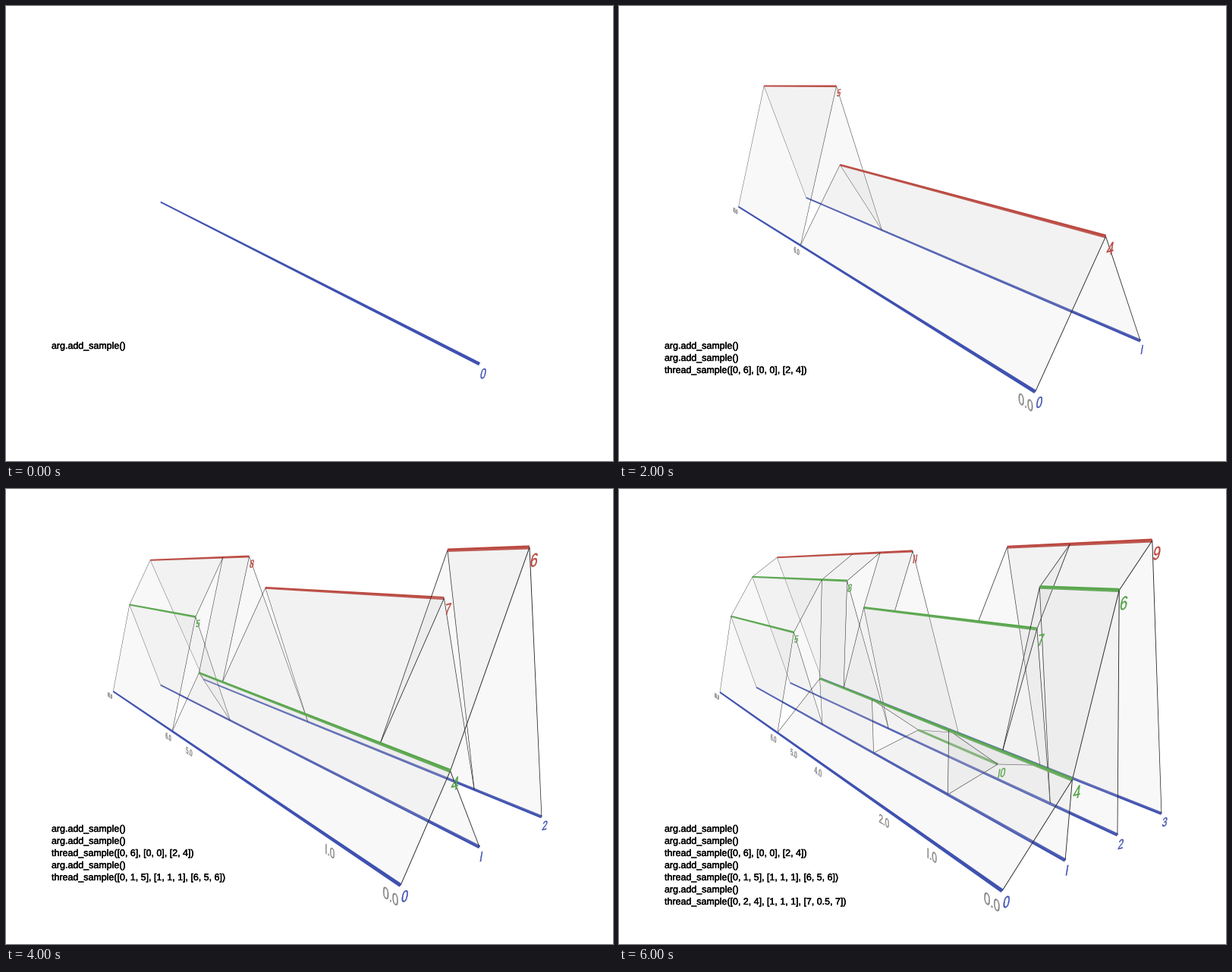
A matplotlib script for the animation above (7000 ms loop, 800 by 600 pixels).

```python
import matplotlib.pyplot as plt
from matplotlib.animation import FuncAnimation
from matplotlib.patches import PathPatch, Polygon
from matplotlib.path import Path
from matplotlib.patheffects import withStroke
from matplotlib.textpath import TextPath
import numpy as np

W, H, DPI = 800, 600, 100
LENGTH = 10
FIRST_NODE = 4
BLUE, RED, GREEN = "#3f51b0", "#bb473f", "#57a64b"
GREY, DARK, FACE = "#858585", "#222222", "#cccccc"
FONT = "Liberation Sans"

# Perspective of (sample axis, time along the line, height, 1)
CAMERA = np.array([[575.3, -15.88, -83.6, 433.1],
                   [40.8, 16.76, -549.5, 524.9],
                   [0.4131, 0.1603, -0.209, 0.9484]])

# None adds a sample, a tuple threads the newest one
STEPS = [
    None,
    None,
    ([0, 6], [0, 0], [2, 4]),
    None,
    ([0, 1, 5], [1, 1, 1], [6, 5, 6]),
    None,
    ([0, 2, 4], [1, 1, 1], [7, 0.5, 7]),
]


class Graph:
    """Ancestral graph with edges (start, end, child, parent)."""

    def __init__(self):
        self.samples = 0
        self.heights = {}
        self.edges = []

    def add_sample(self):
        self.heights[self.samples] = 0
        self.samples += 1

    def thread_sample(self, starts, partners, heights):
        sample = self.samples - 1
        ends = starts[1:] + [LENGTH]
        for lo, hi, partner, height in zip(starts, ends, partners, heights):
            node = FIRST_NODE + len(self.heights) - self.samples
            self.heights[node] = height
            self.join(lo, hi, partner, node)
            self.edges.append((lo, hi, sample, node))

    def join(self, lo, hi, child, node):
        """Climb from child and insert node at its height."""
        above = [e for e in self.edges
                 if e[2] == child and e[0] < hi and e[1] > lo]
        if not above:
            self.edges.append((lo, hi, child, node))
        for edge in above:
            start, end, _, parent = edge
            a, b = max(lo, start), min(hi, end)
            if self.heights[parent] <= self.heights[node]:
                self.join(a, b, parent, node)
                continue
            self.edges.remove(edge)
            pieces = [(start, a, child, parent), (a, b, child, node),
                      (a, b, node, parent), (b, end, child, parent)]
            self.edges += [p for p in pieces if p[0] < p[1]]

    def layout(self):
        """Place samples evenly and each node at the mean of its children."""
        place = {i: (i + 0.5) / self.samples for i in range(self.samples)}
        for node in sorted(self.heights, key=self.heights.get):
            if node not in place:
                below = {e[2] for e in self.edges if e[3] == node}
                place[node] = np.mean([place[c] for c in below])
        return place

    def span(self, node):
        if node < self.samples:
            return 0, LENGTH
        own = [e for e in self.edges if e[3] == node]
        return min(e[0] for e in own), max(e[1] for e in own)


fig = plt.figure(figsize=(W / DPI, H / DPI), dpi=DPI, facecolor="white")
ax = fig.add_axes([0, 0, 1, 1])


def fill(points, color, alpha=1.0):
    ax.add_patch(Polygon(points, closed=True, facecolor=color,
                         edgecolor="none", lw=0, alpha=alpha))


def project(u, t, z):
    """Screen x, y and depth."""
    x, y, depth = CAMERA @ (u, t, z, 1)
    return x / depth, y / depth, depth


def taper(p, q, color, width):
    """Line whose width shrinks with distance from the viewer."""
    a, b = np.array(p[:2]), np.array(q[:2])
    d = (b - a) / np.hypot(*(b - a))
    n = np.array([-d[1], d[0]]) * width / 2
    na, nb = n / p[2], n / q[2]
    fill([a + na, b + nb, b - nb, a - na], color)


def label(text, point, side, gap, drop, size, color, squeeze, slope, lean):
    """Text on a slanted plane, to the right (1) or left (-1) of a point."""
    x, y, depth = point
    glyphs = TextPath((0, 0), text.replace("1", "I"), size=size / depth / 0.71,
                      prop={"family": FONT})
    v, box = glyphs.vertices, glyphs.get_extents()
    cx = x + side * (gap / depth + box.width * squeeze / 2)
    cy = y + drop / depth
    dx = (v[:, 0] - (box.x0 + box.x1) / 2) * squeeze
    dy = v[:, 1] - (box.y0 + box.y1) / 2
    verts = np.column_stack([cx + dx + lean * dy, cy - dy + slope * dx])
    ax.add_patch(PathPatch(Path(verts, glyphs.codes), facecolor=color,
                           edgecolor=color, lw=0.25))


def draw_face(corners, keys, drawn):
    far_low, far_top, near_top, near_low = corners
    fill([p[:2] for p in corners], FACE, 0.13)
    for key, low, top in zip(keys, (far_low, near_low), (far_top, near_top)):
        if key not in drawn:
            drawn.add(key)
            taper(low, top, DARK, 0.95)


def draw_graph(graph):
    place = graph.layout()
    top = max(graph.heights.values()) + 1
    children = {e[2] for e in graph.edges}

    def at(node, t):
        return project(place[node], t, graph.heights[node] / top)

    def color(node):
        if node < graph.samples:
            return BLUE
        return GREEN if node in children else RED

    # Bars and faces together, back to front
    items = [(place[n], n, None) for n in graph.heights]
    items += [((place[e[2]] + place[e[3]]) / 2, None, e) for e in graph.edges]
    drawn = set()
    for _, node, edge in sorted(items, key=lambda item: -item[0]):
        if edge is None:
            near, far = graph.span(node)
            taper(at(node, far), at(node, near), color(node), 5.2)
        else:
            near, far, child, parent = edge
            corners = [at(child, far), at(parent, far),
                       at(parent, near), at(child, near)]
            draw_face(corners, [(far, child, parent), (near, child, parent)],
                      drawn)

    for node in graph.heights:
        drop, size = (14.5, 15.5) if node < graph.samples else (17, 18)
        label(str(node), at(node, graph.span(node)[0]), 1, 2, drop, size,
              color(node), 0.72, -0.25, 0.16)
    for t in sorted({t for e in graph.edges for t in e[:2]}):
        point = at(0, t)
        label(f"{t:.1f}", point, -1, 3.5, 14.5, 15.5, GREY,
              0.25 + 0.45 / point[2], 0.65, 0)


def command(step):
    if step is None:
        return "arg.add_sample()"
    return "thread_sample({}, {}, {})".format(*step)


def draw(i):
    ax.clear()
    ax.set_xlim(0, W)
    ax.set_ylim(H, 0)
    ax.axis("off")

    graph = Graph()
    for row, step in enumerate(STEPS[:i + 1]):
        if step is None:
            graph.add_sample()
        else:
            graph.thread_sample(*step)
        ax.text(60, 452 + 16 * row, command(step), family=FONT,
                fontsize=12.45 * 72 / DPI, color="black", va="baseline",
                path_effects=[withStroke(linewidth=0.3, foreground="black")])
    draw_graph(graph)
    return []


anim = FuncAnimation(fig, draw, frames=len(STEPS), interval=1000,
                     init_func=lambda: [], repeat=True, repeat_delay=0)
plt.show()
```
